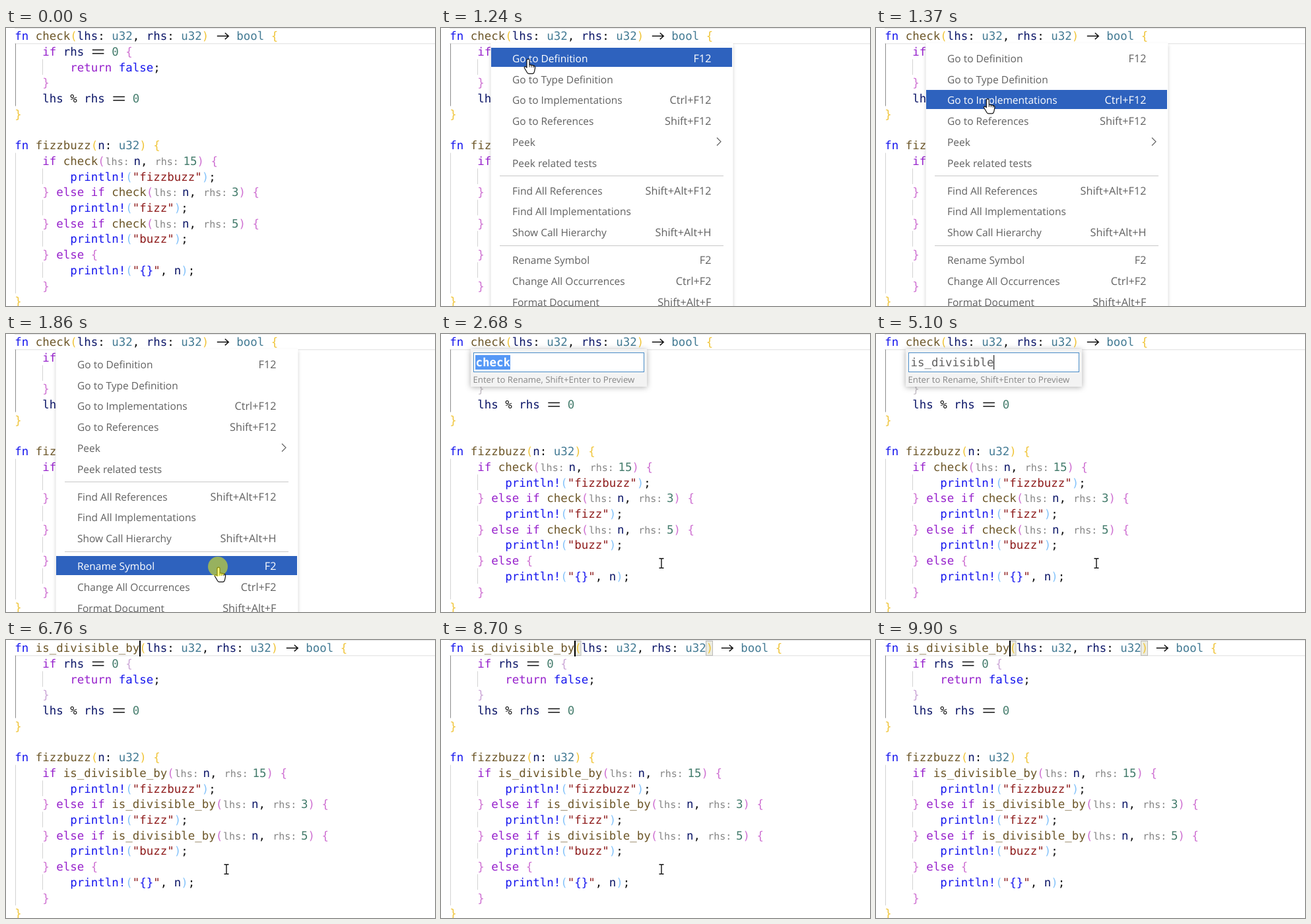
Recreate the animation shown at these times as an HTML page. Size 650 by 422 pixels, loop 10000 ms.

```html
<!DOCTYPE html>
<html lang="en">
<head>
<meta charset="utf-8">
<title>Rename symbol</title>
<style>
  html, body { margin: 0; width: 100%; height: 100%; overflow: hidden; background: #fff; }
  svg { display: block; width: 650px; height: 422px; }
  text { white-space: pre; text-rendering: geometricPrecision; }
  .code { font: 17.44px "DejaVu Sans Mono", monospace; }
  .hint { font: 15px "DejaVu Sans Mono", monospace; }
  .ui { font: 15.5px "Open Sans", sans-serif; fill: #616161; }
  .key { font-size: 16.25px; text-anchor: end; }
  .tip { font-size: 13.2px; fill: #868686; }
  .menu { filter: drop-shadow(0 3px 2.5px rgba(0, 0, 0, .2)); }
  .box { filter: drop-shadow(0 1px 4px rgba(0, 0, 0, .32)); }
</style>
</head>
<body>
<svg id="stage" viewBox="0 0 650 422"></svg>
<script>
const LOOP = 10000, X0 = 13.3, CELL = 10.5, LINE = 23.7, HINT = 43.6;
const stage = document.getElementById("stage");

function add(parent, tag, attrs = {}, content) {
  const node = document.createElementNS("http://www.w3.org/2000/svg", tag);
  for (const k in attrs) node.setAttribute(k, attrs[k]);
  if (content !== undefined) node.textContent = content;
  parent.appendChild(node);
  return node;
}
const group = (parent = stage, attrs) => add(parent, "g", attrs);
const line = (parent, x1, y1, x2, y2, stroke, width = 1) =>
  add(parent, "line", { x1, y1, x2, y2, stroke, "stroke-width": width });
const rect = (parent, x, y, width, height, fill, extra = {}) =>
  add(parent, "rect", { x, y, width, height, fill, ...extra });
const show = (node, on) => node.setAttribute("visibility", on ? "visible" : "hidden");
const place = (node, [x, y]) => node.setAttribute("transform", `translate(${x} ${y})`);

// Editor background: active line and indent guides
for (const y of [0.5, 23.7]) line(stage, 13, y, 650, y, "#e9e9e9", 1.6);
const guide = (x, from, to, color) => line(stage, x, from * LINE, x, to * LINE, color);
guide(14.5, 1, 5, "#8c8c8c");
guide(14.5, 8, 17, "#d3d3d3");
for (const row of [2, 9, 11, 13, 15]) guide(55.5, row, row + 1, "#d3d3d3");

const match = group();
for (const col of [18, 37])
  rect(match, X0 + col * CELL - 0.3, 1.5, 10, 22, "#ecece0", { stroke: "#b9b9b9" });

// Source code; "~" starts an inlay hint
const SOURCE = `fn NAME(lhs: u32, rhs: u32) -> bool {
    if rhs == 0 {
        return false;
    }
    lhs % rhs == 0
}

fn fizzbuzz(n: u32) {
    if NAME(~lhs:n, ~rhs:15) {
        println!("fizzbuzz");
    } else if NAME(~lhs:n, ~rhs:3) {
        println!("fizz");
    } else if NAME(~lhs:n, ~rhs:5) {
        println!("buzz");
    } else {
        println!("{}", n);
    }
}`;
const TOKEN = /~\w+:|"|\{\}|->|==|println!|\w+|\s+|./g;
const BRACKETS = ["#f0c53a", "#cf72d2", "#86c4fb"];
const softBraces = [];

function colorOf(word, inString, next) {
  if (word === "{}") return "#1a1af0";
  if (inString) return "#8f1d1d";
  if (/^(fn|false|println!)$/.test(word)) return "#1717ee";
  if (/^(if|else|return)$/.test(word)) return "#9722cc";
  if (/^(u32|bool)$/.test(word)) return "#447b94";
  if (/^\d+$/.test(word)) return "#447c6c";
  if (/^\w+$/.test(word)) return next === "(" ? "#6d5729" : "#0c1668";
  return "#111";
}

function ligature(parent, word, x, mid) {
  if (word === "==") {
    for (const dy of [-2.7, 2.7]) line(parent, x + 2, mid + dy, x + 19.6, mid + dy, "#111", 1.5);
  } else {
    add(parent, "path", {
      d: `M${x + 2} ${mid}H${x + 19.4}M${x + 14} ${mid - 4.8}L${x + 19.4} ${mid}L${x + 14} ${mid + 4.8}`,
      fill: "none", stroke: "#111", "stroke-width": 1.5
    });
  }
}

function buildCode(name) {
  const root = group(stage, { class: "code" });
  let depth = 0;
  SOURCE.replaceAll("NAME", name).split("\n").forEach((row, i) => {
    const base = 18.3 + i * LINE;
    let x = X0, inString = false;
    const words = row.match(TOKEN) || [];
    words.forEach((word, k) => {
      if (word[0] === "~") {
        add(root, "text", { x: x + 0.8, y: base, class: "hint", fill: "#858585" }, word.slice(1));
        x += HINT;
        return;
      }
      if (word === "->" || word === "==") ligature(root, word, x, base - 6);
      else if (word.trim()) {
        const quote = word === '"';
        let fill = colorOf(word, inString || quote, words[k + 1]);
        if (quote) inString = !inString;
        if (/^[)}]$/.test(word)) fill = BRACKETS[--depth];
        if (/^[({]$/.test(word)) fill = BRACKETS[depth++];
        const node = add(root, "text", { x, y: base, fill }, word);
        if (i > 0 && i < 4 && /[{}]/.test(word)) softBraces.push(node);
      }
      x += word.length * CELL;
    });
  });
  return root;
}
const before = buildCode("check");
const after = buildCode("is_divisible_by");
const caret = rect(stage, 202, 1, 2, 24, "#000");

// Context menu
const ITEMS = [
  ["Go to Definition", "F12"], ["Go to Type Definition"], ["Go to Implementations", "Ctrl+F12"],
  ["Go to References", "Shift+F12"], ["Peek"], ["Peek related tests"],
  ["Find All References", "Shift+Alt+F12"], ["Find All Implementations"],
  ["Show Call Hierarchy", "Shift+Alt+H"], ["Rename Symbol", "F2"],
  ["Change All Occurrences", "Ctrl+F2"], ["Format Document", "Shift+Alt+F"]
];
const rowY = i => 46.3 + 31.75 * i + (i > 5) * 10.3 + (i > 8) * 10.3;
const menu = group();
rect(menu, 75.5, 22.8, 367, 420, "#fff", { class: "menu" });
for (const y of [224.5, 330.5]) line(menu, 89, y, 428, y, "#c8c8c8");
const bar = rect(menu, 76, 0, 365, 29, "#2e62be");
const entries = ITEMS.map(([label, key], i) => {
  const g = group(menu), y = rowY(i) + 5.6;
  add(g, "text", { x: 108, y, class: "ui" }, label);
  if (key) add(g, "text", { x: 409.5, y, class: "ui key" }, key);
  return g;
});
add(menu, "path", { d: "M418 166.5l6 6-6 6", fill: "none", stroke: "#666", "stroke-width": 1.2 });

function selectRow(index) {
  show(bar, index >= 0);
  if (index >= 0) bar.setAttribute("y", Math.round(rowY(index) - 16));
  entries.forEach((g, i) => {
    for (const node of g.children) node.style.fill = i === index ? "#fff" : "";
  });
}

// Rename box
const NEW_NAME = "is_divisible_by";
const KEYS = [3060, 3140, 3470, 3570, 3800, 3900, 4080, 4410, 4640, 4770, 5000, 5100, 5660, 5990, 6120];
const rename = group();
rect(rename, 45, 23, 267, 57, "#f3f3f3", { class: "box" });
rect(rename, 49.5, 28.5, 258, 29, "#fff", { stroke: "#4a8cc8" });
const selection = rect(rename, 52, 32, 53, 22, "#5598f6");
const typed = add(rename, "text", { x: 52.5, y: 49.2, class: "code" });
const inputCaret = rect(rename, 0, 32, 1.2, 22, "#222");
add(rename, "text", { x: 48.5, y: 74, class: "ui tip" }, "Enter to Rename, Shift+Enter to Preview");

// Pointers
const beam = add(stage, "path", {
  d: "M-3.5 -7.3H-1Q0 -7.3 0 -6.3Q0 -7.3 1 -7.3H3.5M0 -6.5V6.5M-3.5 7.3H-1Q0 7.3 0 6.3Q0 7.3 1 7.3H3.5",
  fill: "none", stroke: "#111", "stroke-width": 1.4
});
const outline = { fill: "#fff", stroke: "#111", "stroke-width": 1.2, "stroke-linejoin": "round" };
const arrow = add(stage, "path", { ...outline, d: "M0 0V16.5L3.8 13L6.3 19L9 17.9L6.5 12H11.6Z" });
const hand = group();
add(hand, "path", {
  ...outline,
  d: "M-2 2.2a2 2 0 0 1 4 0V8.6l5.8 1.3q3 .8 2.8 3.7l-1 5q-.7 3.8-3.2 3.8H1.2q-1.6 0-2.6-1.6L-5.4 14q-.9-1.7.4-2.3 1.2-.5 3 1.5Z"
});
add(hand, "path", { d: "M2 8.5V12.5M5 9.4V12.8M8 10.2V13.2", fill: "none", stroke: "#111" });
const click = add(stage, "circle", { r: 15, fill: "#ff0", "fill-opacity": 0.5 });

const smooth = p => p * p * (3 - 2 * p);
const easeOut = p => 1 - (1 - p) ** 2;

// Position at t between two points, advancing in even sampled steps
function travel(t, start, end, steps, from, to, ease) {
  const raw = Math.min(1, Math.max(0, (t - start) / (end - start)));
  const p = ease(Math.floor(raw * steps + 1e-6) / steps);
  return from.map((v, i) => v + (to[i] - v) * p);
}

function handAt(t) {
  if (t < 1240) return [104, 38];
  if (t >= 1730) return [322, 354];
  return travel(t, 1240, 1550, 7, [132, 47], [320, 352], smooth);
}

function draw(t) {
  const within = (a, b) => t >= a && t < b;
  const renamed = t >= 6690;
  show(before, !renamed);
  show(after, renamed);
  show(match, t >= 6810);
  const off = within(7220, 7730) || within(8190, 8700) || within(9210, 9720);
  show(caret, renamed && !off);

  const tone = t < 2230 ? BRACKETS[1] : renamed ? "#cba6d6" : "#c6c0c7";
  for (const node of softBraces) node.setAttribute("fill", tone);

  const onMenu = within(1190, 2160), tip = handAt(t);
  show(menu, within(960, 2160));
  let row = -1;
  if (onMenu) {
    const gaps = ITEMS.map((_, i) => Math.abs(rowY(i) - tip[1]));
    row = gaps.indexOf(Math.min(...gaps));
  }
  selectRow(row);

  const editing = within(2230, 6630);
  const count = KEYS.filter(k => t >= k).length;
  show(rename, editing);
  show(selection, editing && !count);
  typed.textContent = count ? NEW_NAME.slice(0, count) : "check";
  typed.style.fill = count ? "#616161" : "#fff";
  typed.style.fontWeight = count ? "400" : "700";
  inputCaret.setAttribute("x", 52 + count * CELL);
  show(inputCaret, editing && count && !within(5610, 5660));

  show(click, within(890, 960) || within(1860, 2160));
  place(click, t < 1000 ? [77, 20] : [321, 353]);
  show(arrow, within(960, 1190));
  place(arrow, [77, 20.5]);
  show(hand, onMenu);
  place(hand, tip);
  show(beam, within(70, 960) || within(2680, 9900));
  place(beam, t < 960
    ? travel(t, 70, 630, 12, [552, 363], [80, 21], smooth)
    : travel(t, 9210, 9900, 15, [334, 348], [616, 424], p => smooth(easeOut(p) * 0.4 + p * 0.6)));
}

function tick() {
  draw(performance.now() % LOOP);
  requestAnimationFrame(tick);
}
draw(0);
tick();
</script>
</body>
</html>
```
